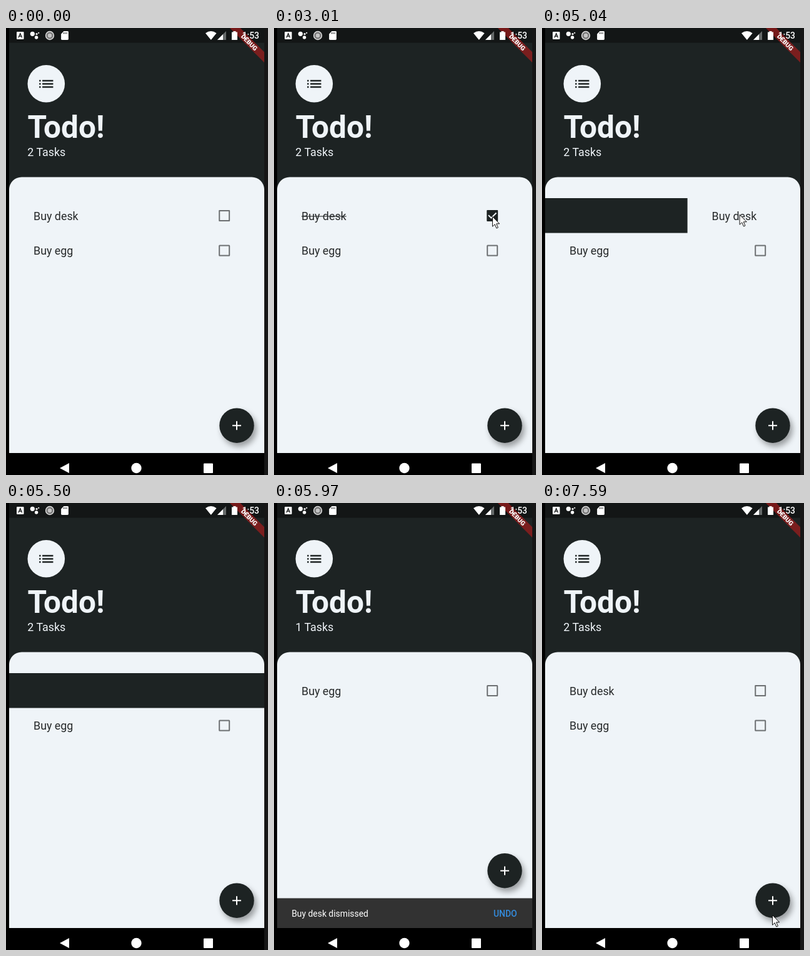
These frames come from a looping animation (419 by 712 pixels, 8000 ms). An HTML page:

```html
<!DOCTYPE html>
<html lang="en">
<head>
<meta charset="utf-8">
<title>Todo list</title>
<style>
  html, body { margin: 0; width: 100%; height: 100%; overflow: hidden; background: #000; }
  svg { display: block; width: 419px; height: 712px; font-family: Roboto, Arial, sans-serif; }
  .ink { fill: #1d2323; }
  .pale { fill: #eff4f8; }
  .white { fill: #fff; }
  .row { font-size: 17.86px; fill: #272a2b; }
  .bar { font-size: 13.9px; }
  #fab circle { filter: drop-shadow(4px 6px 5px rgba(0,0,0,.36)); }
</style>
</head>
<body>
<svg viewBox="0 0 419 712">
  <defs>
    <clipPath id="screen"><rect x="5" width="408" height="677"/></clipPath>
  </defs>
  <rect width="419" height="712"/>
  <rect x="413" width="6" height="712" fill="#161616"/>

  <g clip-path="url(#screen)">
    <rect class="ink" x="5" width="408" height="678"/>
    <rect x="5" width="408" height="23.5" fill="#131616"/>

    <circle class="pale" cx="64.3" cy="88.8" r="29.8"/>
    <path class="ink" transform="translate(49.4 74.1) scale(1.24)" d="M3 13h2v-2H3zM3 17h2v-2H3zM3 9h2V7H3zM7 13h14v-2H7zM7 17h14v-2H7zM7 7v2h14V7z"/>
    <text class="pale" x="34.4" y="175" font-size="49.6" font-weight="700">Todo!</text>
    <text id="count" class="pale" x="34.3" y="204" font-size="17.86">2 Tasks</text>

    <path class="pale" d="M5 678V257.4a20 20 0 0 1 20-20H393a20 20 0 0 1 20 20V678z"/>
    <rect id="back" class="ink" x="5" y="271" height="55.5"/>
    <g id="desk">
      <text class="row" x="44" y="305.5">Buy desk</text>
      <rect id="strike" x="44" y="299.4" width="71.7" height="1.1" fill="#272a2b"/>
      <g transform="translate(349.2 299)">
        <rect id="outer" rx="1"/>
        <rect id="inner" class="pale"/>
        <path id="tick" d="M-6.3 -.9L-1.8 3.6L6.3 -4.5" fill="none" stroke="#eff4f8" stroke-width="2" pathLength="1"/>
      </g>
    </g>
    <g id="egg">
      <text class="row" x="44" y="361">Buy egg</text>
      <rect x="341.2" y="346.5" width="16" height="16" rx=".5" fill="none" stroke="#6d7072" stroke-width="2"/>
    </g>

    <g id="snack">
      <rect x="5" y="629.5" width="408" height="50" fill="#323232"/>
      <g id="note" class="bar">
        <text class="white" x="28.2" y="658.5">Buy desk dismissed</text>
        <text x="351" y="658.5" font-weight="500" fill="#348cdd">UNDO</text>
      </g>
    </g>

    <g id="fab">
      <circle class="ink" cx="369" cy="633.2" r="27.7"/>
      <path d="M362 633.2h14M369 626.2v14" stroke="#fff" stroke-width="2"/>
    </g>

    <g transform="translate(413 -1) rotate(45) scale(.992)">
      <rect x="-40" y="28" width="80" height="12" fill="#b71c1c" fill-opacity=".6"/>
      <text class="white" y="37.7" font-size="10.2" font-weight="900" text-anchor="middle">DEBUG</text>
    </g>

    <!-- status bar -->
    <rect class="white" x="17" y="6" width="11.5" height="12" rx="1"/>
    <path d="M20 15.3L22.75 8.7L25.5 15.3M21 13.2h3.5" fill="none" stroke="#131616" stroke-width="1.3"/>
    <g class="white">
      <circle cx="42.3" cy="9.3" r="3.6"/>
      <circle cx="48.6" cy="15" r="2.7"/>
      <circle cx="49" cy="9.5" r="1.6"/>
      <circle cx="52.2" cy="7.8" r="1.1"/>
    </g>
    <circle cx="70" cy="12" r="6.4" fill="#777" stroke="#ddd" stroke-width="1.5"/>
    <circle cx="70" cy="12" r="3.2" fill="#c4c4c4"/>
    <path class="white" d="M92.5 5H98.5a1.4 1.4 0 0 1 1.4 1.4V17.6a1.4 1.4 0 0 1-1.4 1.4H89.5a1.4 1.4 0 0 1-1.4-1.4V9.4z"/>
    <path d="M92.3 7v2.4M94.7 7v2.4M97.1 7v2.4" stroke="#131616"/>
    <path class="white" d="M319 8.3Q327.8 1.7 336.6 8.3L327.8 19z"/>
    <path d="M352 5V19H338z" fill="#666a6a"/>
    <path class="white" d="M347 10V19H338z"/>
    <path class="white" d="M363.5 5h4v1.4h2.5V19h-9V6.4h2.5z"/>
    <text class="white" x="405" y="16.8" font-size="13.9" font-weight="500" text-anchor="end">1:53</text>
  </g>

  <!-- navigation bar -->
  <path class="white" d="M86 701L101 693V709z"/>
  <circle class="white" cx="208.5" cy="701" r="8.2"/>
  <rect class="white" x="316" y="693.5" width="15" height="15.5" rx="1"/>

  <path id="cursor" d="M.5 .5V16.2L4.2 12.7L6.9 19L9.4 17.9L6.7 11.8H11.7z" fill="#fff" stroke="#111"/>
</svg>

<script>
const LOOP = 8000, START = 610, STEP = 77.56;
const WIDTH = 408, ROW = 55.5, SNACK = 47.5;
const CHECK = 2200, UNCHECK = 3340, DISMISS = 5700, BACK = 6190, UNDO = 7250;
const $ = id => document.getElementById(id);

// Cursor legs: begin, end, x, y to reach
const visit = [[START, START, 354, 665], [START, 1450, 107, 302], [1470, 2000, 355, 288],
  [2000, 2160, 349, 300], [3010, 3080, 344, 300], [3980, 4340, 118, 295], [4340, 4480, 88, 297]];
const comeback = [[BACK, BACK, 388, 442], [BACK, 6500, 305, 545],
  [6500, 6860, 356, 683], [6860, 6960, 368, 656]];

// Smooth rise from 0 to 1 between two times
function ramp(t, from, to) {
  if (t <= from) return 0;
  if (t >= to) return 1;
  const f = (t - from) / (to - from);
  return f * f * (3 - 2 * f);
}

function walk(legs, t) {
  let [, , x, y] = legs[0];
  for (const [from, to, nextX, nextY] of legs) {
    const f = ramp(t, from, to);
    x += (nextX - x) * f;
    y += (nextY - y) * f;
  }
  return [x, y];
}

function set(id, attrs) {
  for (const name in attrs) $(id).setAttribute(name, attrs[name]);
}
const move = (id, x, y) => set(id, { transform: `translate(${x} ${y})` });
const show = (id, on) => set(id, { display: on ? "inline" : "none" });
const square = (id, r) => set(id, { x: -r, y: -r, width: 2 * r, height: 2 * r });

// First half fills the box, second half draws the tick.
function drawCheck(p) {
  const inset = 1 - Math.abs(p - .5) * 2;
  const fill = Math.min(1, p * 2), half = 8.95 - inset;
  const mix = (a, b) => Math.round(a + (b - a) * fill);
  square("outer", half);
  square("inner", (half - 2) * (1 - fill));
  set("outer", { fill: `rgb(${mix(109, 29)},${mix(112, 35)},${mix(114, 35)})` });
  set("tick", { "stroke-dasharray": `${Math.max(0, p * 2 - 1)} 2` });
  show("tick", p > .5);
}

function drawCursor(t, away) {
  let [x, y] = walk(t < BACK ? visit : comeback, t);
  if (t < BACK) x += away;
  show("cursor", t >= START && x < 401);
  move("cursor", x, y);
}

function draw(time) {
  const t = time < START ? 0 : START + Math.floor((time - START + 10) / STEP) * STEP;
  const gone = t >= DISMISS && t < UNDO;
  const away = t < UNDO ? WIDTH * ramp(t, 4600, 5400) : 0;
  const fold = t < UNDO ? ramp(t, 5520, DISMISS) : 0;
  const rise = ramp(t, DISMISS, 5950) - ramp(t, 7190, 7580);

  $("count").textContent = gone ? "1 Tasks" : "2 Tasks";
  set("back", { width: away, height: ROW * (1 - fold) });
  move("desk", away, 0);
  show("desk", away < WIDTH);
  move("egg", 0, -ROW * fold);
  show("strike", t >= CHECK && t < UNCHECK);
  drawCheck(ramp(t, CHECK, 2540) - ramp(t, UNCHECK, 3560));

  move("snack", 0, SNACK * (1 - rise));
  show("snack", rise > 0);
  set("note", { opacity: Math.max(0, (rise - .4) / .6) });
  move("fab", 0, -SNACK * rise);
  drawCursor(t, away);
}

const begin = performance.now();
function tick() {
  draw((performance.now() - begin) % LOOP);
  requestAnimationFrame(tick);
}
tick();
</script>
</body>
</html>
```
